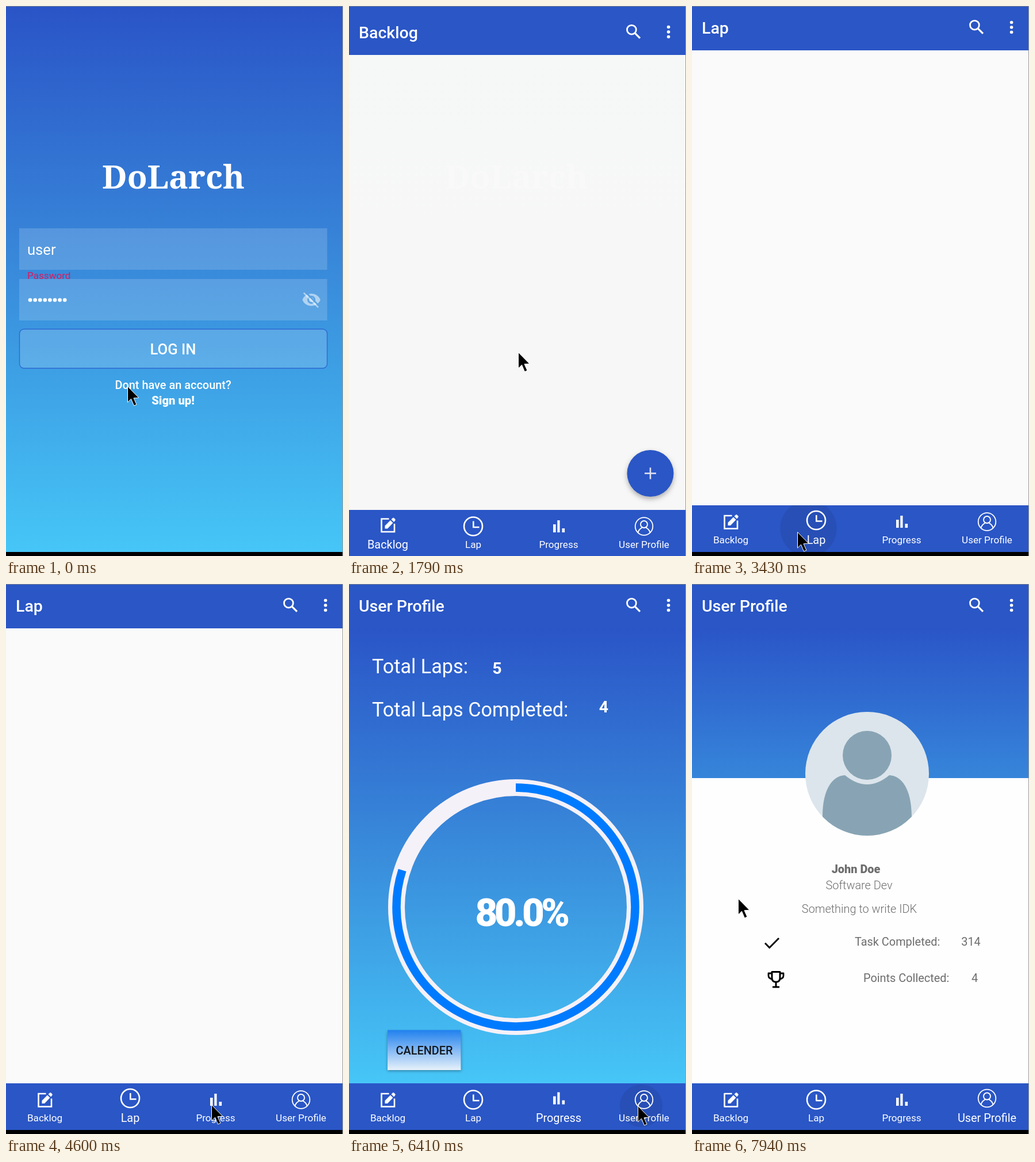
An HTML page with a canvas for the animation above (8 s loop, 586 by 955 pixels).

```html
<!DOCTYPE html>
<html lang="en">
<head>
<meta charset="utf-8">
<title>Task app walkthrough</title>
<style>
html, body { margin: 0; width: 100%; height: 100%; overflow: hidden; background: #000; }
canvas { display: block; width: 586px; height: 955px; }
</style>
</head>
<body>
<canvas id="stage" width="586" height="955"></canvas>
<script>
const W = 586, H = 955, LOOP = 8000;
const BLUE = '#2a56c6', GREY = '#6d6d6d', LILAC = '#d8d5e5';
const ctx = document.getElementById('stage').getContext('2d');

// time, x, y of the pointer tip; it jumps between samples
const POINTER = [
  [0, 211, 660], [120, 243, 645], [250, 282, 625], [400, 291, 610], [520, 295, 603],
  [640, 296, 602], [800, 294, 601], [2490, 180, 850], [2610, 126, 929], [2730, 126, 925],
  [2880, 148, 918], [3000, 164, 914], [3160, 178, 914], [3280, 183, 913], [3940, 212, 909],
  [4090, 272, 902], [4210, 332, 904], [4330, 361, 907], [4600, 357, 904], [5260, 373, 903],
  [5410, 395, 904], [5530, 425, 908], [5650, 460, 914], [5770, 486, 916], [5890, 498, 910],
  [6010, 502, 906], [7240, 500, 907], [7360, -99, 0], [7820, 110, 483], [7940, 80, 546]
];

const CARDS = [
  ['Low', 'Lap1', 8, '#1f87e4', '#8aa9de'],
  ['Mid', 'lap2', 17, '#0eab5e', '#42f5a8'],
  ['High', 'Lap3', 12, '#de1515', '#c82c3e'],
  ['Low', 'database project', 5, '#1f87e4', '#8aa9de']
];

const TABS = [['Backlog', 67.5], ['Lap', 216], ['Progress', 364.5], ['User Profile', 513]];

function rect(x, y, w, h, fill) {
  ctx.fillStyle = fill;
  ctx.fillRect(x, y, w, h);
}

function round(x, y, w, h, r, fill) {
  ctx.beginPath();
  ctx.roundRect(x, y, w, h, r);
  ctx.fillStyle = fill;
  ctx.fill();
}

function disc(x, y, r, fill) {
  ctx.beginPath();
  ctx.arc(x, y, r, 0, 7);
  ctx.fillStyle = fill;
  ctx.fill();
}

function ring(x, y, r, width, color, turn = 1) {
  ctx.beginPath();
  ctx.arc(x, y, r, -Math.PI / 2, Math.PI * (2 * turn - 0.5));
  ctx.lineWidth = width;
  ctx.strokeStyle = color;
  ctx.stroke();
}

function line(width, color, ...p) {
  ctx.beginPath();
  for (let i = 0; i < p.length; i += 2) ctx.lineTo(p[i], p[i + 1]);
  ctx.lineWidth = width;
  ctx.strokeStyle = color;
  ctx.stroke();
}

function trace(d, fill, stroke, width) {
  const p = new Path2D(d);
  if (fill) { ctx.fillStyle = fill; ctx.fill(p); }
  if (stroke) { ctx.lineWidth = width; ctx.strokeStyle = stroke; ctx.stroke(p); }
}

function text(s, x, y, size, color = '#fff', align = 'left', weight = 400, family = 'Roboto, sans-serif') {
  ctx.font = `${weight} ${size}px ${family}`;
  ctx.textAlign = align;
  ctx.fillStyle = color;
  ctx.fillText(s, x, y);
}

function shade(y0, y1, ...colors) {
  const g = ctx.createLinearGradient(0, y0, 0, y1);
  colors.forEach((c, i) => g.addColorStop(i / (colors.length - 1), c));
  return g;
}

const sky = (y0, y1) => shade(y0, y1, '#2a54c7', '#398cdb', '#46c6f7');

// run a drawing in its own saved state, moved by x, y
function at(x, y, draw) {
  ctx.save();
  ctx.translate(x, y);
  draw();
  ctx.restore();
}

function shadowed(blur, dy, alpha, draw) {
  at(0, 0, () => {
    ctx.shadowBlur = blur;
    ctx.shadowOffsetY = dy;
    ctx.shadowColor = `rgba(0,0,0,${alpha})`;
    draw();
  });
}

function plus(x, y, arm, width, color) {
  line(width, color, x - arm, y, x + arm, y);
  line(width, color, x, y - arm, x, y + arm);
}

function logo(color) {
  text('DoLarch', 291, 317, 57, color, 'center', 900, '"Noto Serif", serif');
}

function hiddenEye() {
  at(514, 493, () => {
    ctx.scale(1.42, 1.42);
    const soft = 'rgba(255,255,255,.52)';
    line(1.8, soft, 2.6, 3.6, 20.4, 21.4);
    const gap = new Path2D('M-2-2H26V26H-2ZM1 2L2.7 2L23 22.2L21 24L23.2 22L24 20.8L5 1.2Z');
    ctx.clip(gap, 'evenodd');
    const eye = new Path2D('M1 12C4.5 2 19.5 2 23 12C19.5 22 4.5 22 1 12Z');
    for (const r of [5, 3]) {
      eye.moveTo(12 + r, 12);
      eye.arc(12, 12, r, 0, 7);
    }
    ctx.fillStyle = soft;
    ctx.fill(eye, 'evenodd');
  });
}

function login(t) {
  rect(0, 0, W, 948, sky(0, 948));
  logo('#fff');
  const glass = 'rgba(255,255,255,.16)';
  rect(23, 386, 535.5, 72, glass);
  rect(23, 474, 535.5, 72, glass);
  text('user', 37, 432, 25.6);
  text('Password', 37, 474, 17.1, '#d81b60');
  for (let i = 0; i < 8; i++) disc(42 + i * 8.6, 510.5, 3.3, '#fff');
  if ((t >= 120 && t < 640) || t >= 1200) rect(106, 492, 3, 36, '#d81b60');
  hiddenEye();
  round(23.5, 561, 535, 68, 8, glass);
  ctx.lineWidth = 1.4;
  ctx.strokeStyle = '#2e6ad2';
  ctx.stroke();
  text('LOG IN', 290.5, 605, 25.6, '#fff', 'center', 500);
  text('Dont have an account?', 290.5, 665, 19.9, '#fff', 'center', 500);
  text('Sign up!', 290.5, 692, 20.2, '#fff', 'center', 800);
}

function header(title) {
  rect(0, -10, W, 87, BLUE);
  text(title, 17, 48, 28.5, '#fff', 'left', 500);
  ring(491.4, 33.2, 7.9, 2.8, '#fff');
  line(3.2, '#fff', 496.5, 38.3, 506, 47.8);
  for (const y of [28.5, 37, 45.5]) disc(555.6, y, 2.8, '#fff');
}

const ICONS = [
  () => {
    trace('M2 -10.5H-11V12H11.5V-2', null, '#fff', 2.6);
    trace('M-5 6.5V1.5L4.5 -8L9 -3.5L-.5 6.5Z', '#fff');
    trace('M6 -9.5L8.5 -12Q9.6 -12.8 10.7 -12L12.8 -9.9Q13.6 -8.8 12.8 -7.8L10.5 -5Z', '#fff');
  },
  () => {
    ring(0, 0, 16, 2.6, '#fff');
    line(2.6, '#fff', 0.3, -9, 0.3, 1.5, 10.5, 1.5);
  },
  () => {
    rect(-9.5, -3.5, 4.6, 14, '#fff');
    rect(-2.2, -10.5, 4.2, 21, '#fff');
    rect(6, 3.5, 4.6, 7, '#fff');
  },
  () => {
    ring(0, 0, 15.3, 1.8, '#fff');
    ring(0, -3.5, 6, 1.9, '#fff');
    trace('M-10.5 11C-9.5 5.5 -6 4 -3.5 2.2M10.5 11C9.5 5.5 6 4 3.5 2.2', null, '#fff', 1.9);
  }
];

function ripple(x, y, r, alpha) {
  ctx.save();
  ctx.beginPath();
  ctx.rect(0, 867, W, 81);
  ctx.clip();
  disc(x, y, r, `rgba(25,40,90,${alpha})`);
  ctx.restore();
}

function nav(t) {
  rect(0, 867, W, 81, BLUE);
  if (t >= 3430 && t < 3940) ripple(202.5, 907, 49, 0.15);
  if (t >= 4880 && t < 5000) ripple(363, 905, 17, 0.1);
  if (t >= 6410 && t < 6560) ripple(508, 906, 37, 0.15);
  const active = t < 3430 ? 0 : t < 4880 ? 1 : t < 6560 ? 2 : 3;
  const moving = t >= 4880 && t < 5000;
  TABS.forEach(([name, x], i) => {
    const on = i === active;
    const grow = on ? (moving ? 0.6 : 1) : 0;
    const dim = moving && (on || i === 1);
    at(x, 895.5 - 2.5 * grow, ICONS[i]);
    text(name, x, 933 + grow * 0.6, 17.1 + 2.8 * grow, dim ? '#d3dcf3' : '#fff', 'center');
  });
}

function helper() {
  ctx.lineJoin = 'round';
  ring(46.5, 229, 4.5, 1.2, '#888');
  trace('M37 251V246H35V236Q36 233 41 233H50L54 230L56 233L51 238V251H46V243H42V251Z', null, '#888', 1.2);
  trace('M55 237V225Q58 223 61 226V233Q58 231 55 233', null, '#888', 1.2);
}

function book() {
  trace('M129 225H121.5V250.5H145.5V225H142', null, '#868686', 4.6);
  trace('M131 222H142V239L136.5 234L131 239Z', '#767676');
}

function card([level, name, points, top, bottom], y) {
  at(0, y - 89, () => {
    round(5.5, 89, 570.5, 187.5, 11, '#fff');
    round(28, 100, 225.5, 81, 14, shade(100, 181, top, bottom));
    ctx.save();
    ctx.beginPath();
    ctx.rect(28, 100, 225, 48.6);
    ctx.clip();
    text('Priority ' + level, 104.5, 147.5, 20, '#f6f8fc', 'center');
    ctx.restore();
    text(name, 28.5, 214, 19.9, GREY);
    helper();
    text('0', 85, 250, 19.9, GREY, 'center');
    book();
    text('0', 176, 250, 19.9, GREY, 'center');
    text(points, 552.5, 157, 42.7, '#1d7be8', 'right');
    text('points', 553, 190, 19.9, '#1d7be8', 'right');
    shadowed(7, 3, 0.28, () => {
      disc(450, 224, 29, '#fff');
      disc(524.5, 224, 29, LILAC);
    });
    plus(450.5, 224, 10, 2.8, LILAC);
    disc(524.5, 218, 6.2, '#fff');
    trace('M512.5 236V232.5Q513.5 226.5 524.5 226.5T536.5 232.5V236Z', '#fff');
  });
}

function backlog(t) {
  if (t < 1940) {
    rect(0, 70, W, 800, shade(70, 380, '#f5f8f7', '#f7f7f7'));
    at(0, -8, () => logo('#f9f9f9'));
  } else {
    rect(0, 70, W, 800, '#dedede');
    const g = ctx.createLinearGradient(0, 0, W, 0);
    [[0, '#d6d6d6'], [0.07, '#c4c4c4'], [0.93, '#c4c4c4'], [1, '#d6d6d6']].forEach(s => g.addColorStop(...s));
    CARDS.forEach((c, i) => {
      const y = 89 + i * 210.6;
      if (i) rect(0, y - 34, W, 44, g);
    });
    CARDS.forEach((c, i) => card(c, 89 + i * 210.6));
  }
  shadowed(9, 4, 0.3, () => disc(524, 803.5, 40.5, BLUE));
  plus(524, 803.5, 10, 2.6, '#dfe0f2');
}

function progress(t) {
  rect(0, 70, W, 800, sky(70, 867));
  text('Total Laps:', 40, 155, 34.2);
  text('Total Laps Completed:', 40, 230, 34.2);
  ring(290, 561, 207.5, 29, '#f5f1f8');
  if (t >= 5000) {
    text('5', 257.5, 156, 28.5, '#fff', 'center', 700);
    text('4', 443, 223, 28.5, '#fff', 'center', 700);
    ring(290, 561, 207.5, 14.5, '#007bff', 0.8);
    ctx.letterSpacing = '-5.5px';
    text('80.0%', 299, 594, 67, '#fff', 'center', 900);
    ctx.letterSpacing = '0px';
  }
  shadowed(5, 2, 0.35, () => rect(67, 774.5, 127.5, 69.5, shade(774, 844, '#1f80ee', '#e6f1fa')));
  text('CALENDER', 131, 817, 19.9, '#131820', 'center', 500);
}

function trophy() {
  ctx.lineJoin = 'round';
  trace('M139 673.5H153V684Q153 691 146 691T139 684Z', null, '#000', 3);
  trace('M139 676H133V680Q133 685 139.5 686M153 676H159V680Q159 685 152.5 686', null, '#000', 2.8);
  line(3, '#000', 146, 691, 146, 699);
  line(3, '#000', 140, 699.8, 152, 699.8);
}

function profile() {
  rect(0, 70, W, 800, '#fefefe');
  rect(0, 70, W, 267, shade(70, 337, '#2a54c7', '#3685da'));
  ctx.save();
  disc(304.5, 329.5, 107.5, '#dce5ec');
  ctx.clip();
  disc(304.5, 297.5, 42.5, '#88a4b4');
  trace('M227 445V404C227 355 245 333 266 332Q304.5 364 343 332C364 333 382 355 382 404V445Z', '#88a4b4');
  ctx.restore();
  text('John Doe', 285, 502, 19.9, GREY, 'center', 800);
  text('Software Dev', 290.5, 530, 19.9, GREY, 'center', 300);
  text('Something to write IDK', 291, 571, 19.9, GREY, 'center', 300);
  text('Task Completed:', 283, 628, 19.9, GREY);
  text('314', 485, 628, 19.9, GREY, 'center');
  text('Points Collected:', 298, 691, 19.9, GREY);
  text('4', 491.5, 691, 19.9, GREY, 'center');
  line(2.9, '#000', 127, 623.5, 134.7, 631.5, 151, 615);
  trophy();
}

function pointer(t) {
  const [, x, y] = POINTER.findLast(p => p[0] <= t);
  at(x, y, () => trace('M.5 .5V28L6.5 22.2L11.5 34L16 32L11 20.8L19.8 20.2Z', '#000', '#fff', 1));
}

function app(t) {
  if (t < 3430) backlog(t);
  else if (t < 4880) rect(0, 70, W, 800, '#fafafa');
  else if (t < 6560) progress(t);
  else profile();
  const title = t < 3430 ? 0 : t < 4880 ? 1 : t < 6410 ? 2 : 3;
  header(TABS[title][0]);
  nav(t);
}

function draw(t) {
  rect(0, 0, W, H, '#000');
  if (t < 1790) login(t);
  else at(0, t < 2060 ? 8 : 0, () => app(t));
  rect(0, 0, W, 1, '#7d828c');
  rect(585, 0, 1, H, '#9a9a9a');
  pointer(t);
}

const start = performance.now();
function tick(now) {
  draw(Math.max(0, now - start) % LOOP);
  requestAnimationFrame(tick);
}
requestAnimationFrame(tick);
</script>
</body>
</html>
```
